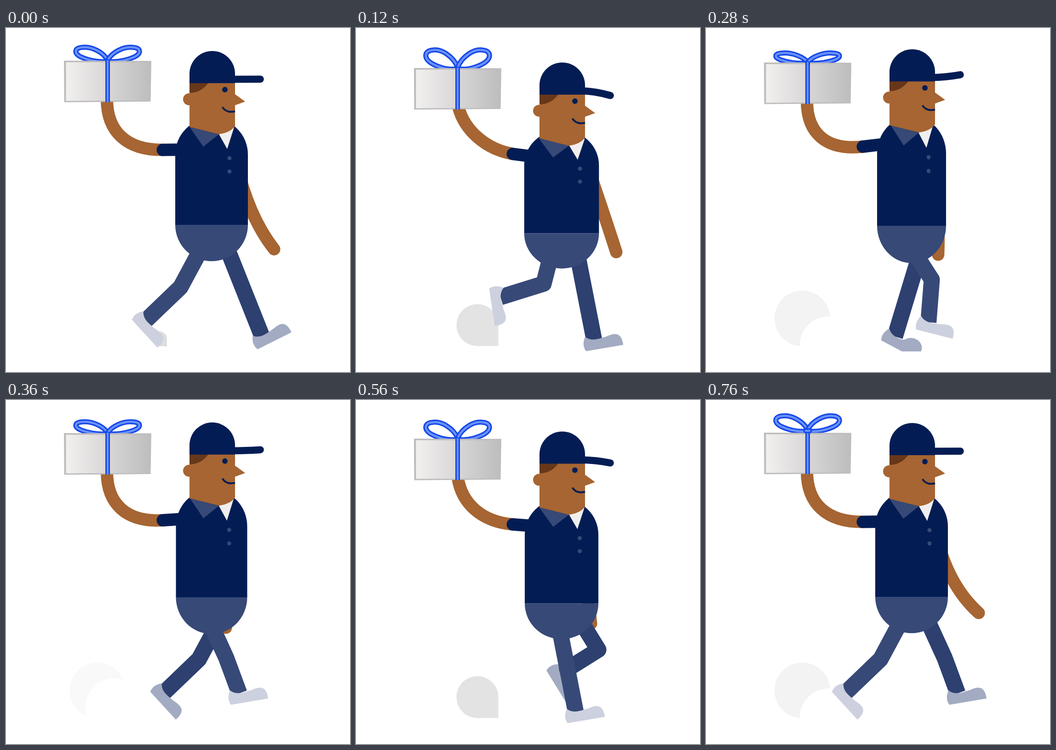
Animation of 748 by 748 pixels, one loop 800 ms. Source, as an HTML page with a canvas:

```html
<!DOCTYPE html>
<html lang="en">
<head>
<meta charset="utf-8">
<title>Walking courier</title>
<style>
html, body { margin: 0; width: 100%; height: 100%; overflow: hidden; background: #fff; }
canvas { display: block; }
</style>
</head>
<body>
<canvas id="stage" width="748" height="748"></canvas>
<script>
const ctx = document.getElementById('stage').getContext('2d');
const TICK = 40, TICKS = 20;
const NAVY = '#031d54', SLATE = '#374977', SKIN = '#a66532', WHITE = '#fff';
const BLUE = '#1548ea', SKY = '#6b92f8';
const FAR = { pants: '#2d4070', shoe: '#a3abc2', shift: 0 };
const NEAR = { pants: SLATE, shoe: '#cdd0de', shift: -40 };

// hem, stretch x, stretch y, brim bend, box drop, sleeve drop, bow height, bow lift
const rest = [428, 1, 1, 0, 0, 0, 1, 0];
const low = [446.5, 1.032, .968, 11, 16, 9.5, 1.35, 0];
const rising = [442.5, 1.013, .981, 7, 13, 5.5, 1.22, 0];
const passing = [434, .968, 1.013, -2, 7, -2.5, .88, 0];
const high = [430, .949, 1.027, -6, 4, -7, .72, 0];
const settling = [429, .981, 1.01, -2, 1, -3.5, .85, 0];
const bodyKeys = [
  [0, rest], [2, low], [4, rising], [5, passing], [7, high], [9, settling],
  [10, rest], [12, low], [14, rising], [15, passing], [17, high],
  [19, [428, 1, 1, 0, 0, 0, 1.08, -5]]
];

// hand x, hand y, elbow x, elbow y
const armKeys = [
  [0, [583, 481, 527, 410]], [2, [575, 486, 548, 410]], [5, [542, 489, 525, 430]],
  [9, [478, 495, 495, 410]], [14, [511, 486, 500, 400]], [17, [557, 475, 512, 415]],
  [19, [593, 463, 525, 402]]
];

// hip, knee, ankle, shoe angle in degrees, toe bend
const poses = {
  contact: [485, 490, 520, 578, 555, 666, -28, 0],
  down: [481, 490, 499, 582, 517, 674, -11, 0],
  flat: [472, 498, 469, 587, 466, 677, 0, 0],
  push: [464, 495, 438, 581, 412, 667, 27, 1],
  lift: [459, 490, 419.5, 563.5, 347, 633, 46, 0],
  kick: [461, 505, 448, 556, 358, 584, 80, 0],
  bend: [498, 496, 527, 543, 447, 593, 57, 0],
  swing: [489, 482, 531, 547, 524, 636, 13, 0],
  reach: [487, 491, 519, 561, 546, 634, -11, 0]
};
const farSteps = ['contact', 'down', 'flat', 'push', 'lift', 'kick', 'bend', 'swing', 'reach'];
const nearSteps = ['lift', 'kick', 'bend', 'swing', 'reach', 'contact', 'down', 'push', 'lift'];

// centre x, centre y, radius, grey, then the centre of the bite
const puffs = [
  [334, 676, 16, '#ddd'],
  [264, 646, 45.5, '#e3e3e3'],
  [219.5, 631.5, 60.5, '#ededed', 290, 712],
  [209.5, 631.5, 60.5, '#f3f3f3', 267, 690],
  [199, 631.5, 60.5, '#f9f9f9', 236, 668]
];

// Smooth looping curve through unevenly spaced keys
function sample(keys, t) {
  const n = keys.length;
  const key = k => {
    const [time, v] = keys[(k + n) % n];
    return { time: time + TICKS * Math.floor(k / n), v };
  };
  let k = 0;
  while (k < n - 1 && keys[k + 1][0] <= t) k++;
  const [a, b, c, d] = [key(k - 1), key(k), key(k + 1), key(k + 2)];
  const span = c.time - b.time, u = (t - b.time) / span;
  return b.v.map((p, j) => {
    const q = c.v[j];
    const m0 = (q - a.v[j]) / (c.time - a.time) * span;
    const m1 = (d.v[j] - p) / (d.time - b.time) * span;
    return p + u * (m0 + u * (3 * (q - p) - 2 * m0 - m1 + u * (2 * (p - q) + m0 + m1)));
  });
}

function fill(path, color) {
  ctx.fillStyle = color;
  ctx.fill(new Path2D(path));
}

function stroke(path, color, width, cap = 'butt') {
  ctx.strokeStyle = color;
  ctx.lineWidth = width;
  ctx.lineCap = cap;
  ctx.lineJoin = 'round';
  ctx.stroke(new Path2D(path));
}

function disc(x, y, r, color) {
  ctx.fillStyle = color;
  ctx.beginPath();
  ctx.arc(x, y, r, 0, Math.PI * 2);
  ctx.fill();
}

function at(x, y, draw) {
  ctx.save();
  ctx.translate(x, y);
  draw();
  ctx.restore();
}

function drawPuff([x, y, r, grey, biteX, biteY]) {
  disc(x, y, r, grey);
  ctx.fillRect(x, y, r, r);
  if (biteX) disc(biteX, biteY, 63, WHITE);
}

function drawLeg(pose, { pants, shoe, shift }) {
  const [hx, hy, kx, ky, ax, ay, angle, bend] = poses[pose];
  at(shift, 0, () => {
    const len = Math.hypot(ax - kx, ay - ky);
    const ex = ax + (ax - kx) / len * 4, ey = ay + (ay - ky) / len * 4;
    stroke(`M${hx},${hy}L${kx},${ky}L${ex},${ey}`, pants, 35);
    at(ax, ay, () => {
      ctx.rotate(angle * Math.PI / 180);
      const toe = bend
        ? 'C24,2 26,-7 33,-9C46,-16 65,-10 66,7L29,26'
        : 'C28,3 33,0 43,0C56,0 61,10 60,27';
      fill(`M-18,-6Q-7,7 17,3${toe}L-22,25C-27,15 -25,4 -18,-6Z`, shoe);
    });
  });
}

function drawTorso(hem, sx, sy) {
  at(447, hem, () => {
    ctx.scale(sx, sy);
    fill('M-79,0V-153A79,79 0 0 1 79,-153V0Z', NAVY);
    fill('M-79,0H79A79,79 0 0 1 -79,0Z', SLATE);
    fill('M-48,-213L16,-197L-18,-170Z', SLATE);
    fill('M16,-197L36,-215L49,-212L34,-165Z', '#f1efee');
    for (const y of [-145, -116]) disc(39, y, 4.5, SLATE);
  });
}

function drawHead(top, brim) {
  at(0, top - 50, () => {
    disc(398, 155, 13, SKIN);
    fill('M399,115H498V144L520,160L498,168V213Q489,227 463,231L399,215Z', SKIN);
    fill('M399,118H441Q425,141 399,141Z', '#673719');
    disc(476, 134, 6, NAVY);
    stroke('M470.5,172Q480,186 498,181', NAVY, 4);
    stroke(`M488,111.5Q522,${111.5 + brim * .1} 553,${111.3 + brim}`, NAVY, 15.5, 'round');
    fill('M399,120V99.5A49.5,49.5 0 0 1 498,99.5V120Z', NAVY);
  });
}

function drawRaisedArm(drop, sleeve) {
  const lean = Math.max(0, sleeve) / 9.5, slope = sleeve * .0155 - .01;
  const hand = 155 + drop, y = 265 + sleeve;
  const arm = `M${219.5 + lean * 3},${hand}C${219.5 + lean * 18},${hand + 70 - lean * 18} `
    + `${262 + lean * 24},${y - 75 * slope} 341,${y}`;
  stroke(arm, SKIN, 27);
  stroke(`M341,${y}L384,${y + 43 * slope}`, NAVY, 27, 'round');
}

function ribbon(path) {
  stroke(path, BLUE, 11, 'round');
  stroke(path, SKY, 4.5, 'round');
}

function drawBow(y, k, lift) {
  at(221, y + lift, () => {
    for (const side of [-1, 1]) {
      const p = (x, v) => `${x * side},${v * k} `;
      ribbon(`M${p(0, -2)}C${p(10, -20)}${p(35, -32)}${p(54, -30)}`
        + `C${p(73, -29)}${p(74, -17)}${p(58, -9)}C${p(45, -3)}${p(25, 2)}${p(8, 1)}`);
    }
  });
}

function drawGift(drop, k, lift) {
  drawBow(72 + drop, k, lift);
  at(0, drop, () => {
    const g = ctx.createLinearGradient(130, 0, 316, 0);
    g.addColorStop(0, '#f2f0ef');
    g.addColorStop(.45, '#dad8d8');
    g.addColorStop(1, '#bdbdbd');
    fill('M126,71L316,71.5L314.5,160L126.5,161.5Z', '#bebdbd');
    fill('M130.5,74.5H314L313,157.5L130.5,158.5Z', g);
    fill('M216,161V70Q221,65 226,70V161Z', BLUE);
    fill('M219,161V70H223V161Z', SKY);
    if (lift < -2) ribbon(`M217,${72 + lift}H225`);
  });
}

function draw(tick) {
  const [hem, sx, sy, brim, drop, sleeve, bow, lift] = sample(bodyKeys, tick);
  const [handX, handY, elbowX, elbowY] = sample(armKeys, tick);
  const step = Math.floor((tick + 1) / 2.5);

  ctx.fillStyle = WHITE;
  ctx.fillRect(0, 0, 748, 748);
  drawPuff(puffs[step % puffs.length]);
  stroke(`M500,290Q${elbowX},${elbowY} ${handX},${handY}`, SKIN, 27, 'round');
  drawLeg(farSteps[step], FAR);
  drawLeg(nearSteps[step], NEAR);
  drawTorso(hem, sx, sy);
  drawHead(hem - 213 * sy - 165, brim);
  drawRaisedArm(drop, sleeve);
  drawGift(drop, bow, lift);
}

const start = performance.now();
function loop() {
  draw(Math.floor((performance.now() - start) / TICK) % TICKS);
  requestAnimationFrame(loop);
}
loop();
</script>
</body>
</html>
```
